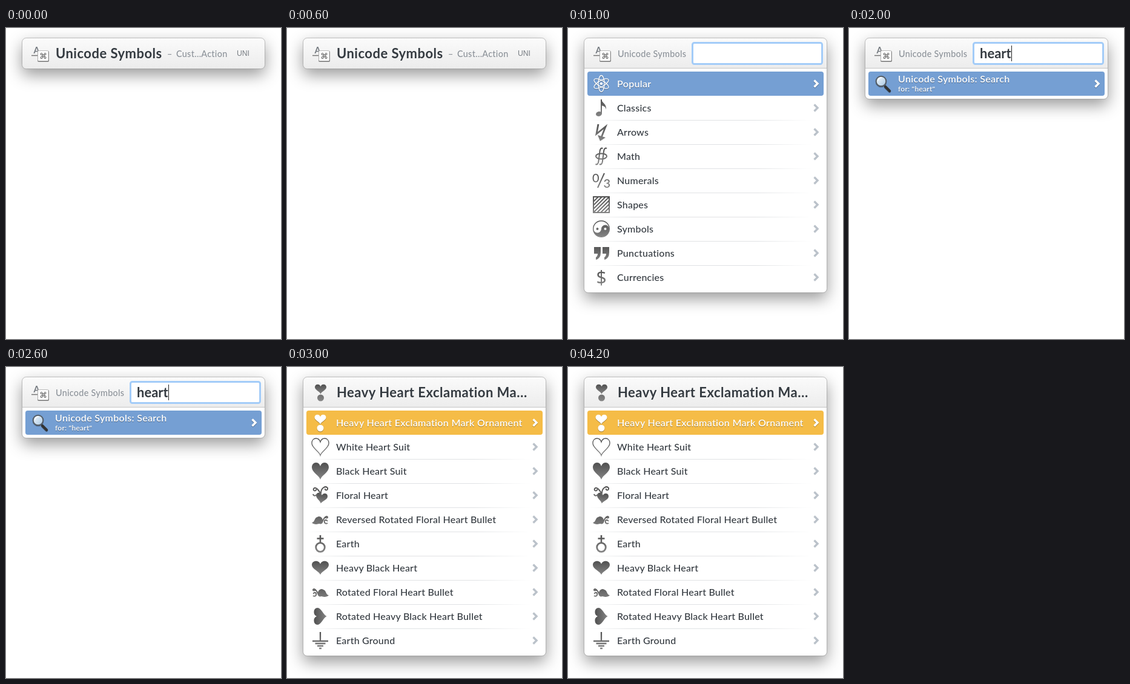
An HTML page for the animation above (5 s loop, 454 px wide and 514 px high).

```html
<!DOCTYPE html>
<html lang="en">
<head>
<meta charset="utf-8">
<title>Symbol finder</title>
<style>
html, body { margin: 0; width: 100%; height: 100%; overflow: hidden; background: #fff; }
svg { display: block; }
text { font: 500 16px Lato, "Open Sans", sans-serif; letter-spacing: .013em; fill: #343a40; }
.title { font-size: 22px; font-weight: 700; letter-spacing: .022em; }
.small { font-size: 14.4px; fill: #8c9299; letter-spacing: .02em; }
.panel { fill: #fff; filter: drop-shadow(0 10px 13px rgba(0,0,0,.4)); }
.edge { fill: none; stroke: rgba(0,0,0,.24); }
.icon { fill: url(#ink); }
.line { fill: none; stroke: url(#ink); stroke-width: 2; }
.chevron { fill: none; stroke: #bbc2ca; stroke-width: 3.4; }
.on { filter: drop-shadow(0 1px .6px rgba(0,0,0,.35)); }
.on text { fill: #fff; font-weight: 600; letter-spacing: .02em; }
.on .icon { fill: #fff; }
.on .line, .on .chevron { stroke: #fff; }
.on .sub { font-size: 12px; }
</style>
</head>
<body>
<svg width="454" height="514" viewBox="0 0 454 514">
<defs>
  <linearGradient id="ink" gradientUnits="userSpaceOnUse" x1="0" y1="-14" x2="0" y2="14">
    <stop stop-color="#505050"/><stop offset="1" stop-color="#858585"/>
  </linearGradient>
  <linearGradient id="bar" x2="0" y2="1">
    <stop stop-color="#fbfbfb"/><stop offset="1" stop-color="#ececec"/>
  </linearGradient>
  <linearGradient id="fade">
    <stop stop-color="#e0e2e4" stop-opacity="0"/><stop offset=".2" stop-color="#e0e2e4"/>
    <stop offset=".75" stop-color="#e0e2e4"/><stop offset="1" stop-color="#e0e2e4" stop-opacity="0"/>
  </linearGradient>
  <linearGradient id="glass" x2="1" y2="1">
    <stop stop-color="#f4f9fd"/><stop offset="1" stop-color="#a9c8e4"/>
  </linearGradient>
  <clipPath id="box"><path d="M-13-13h26v26h-26z"/></clipPath>
</defs>
<g id="stage"></g>
</svg>
<script>
const BLUE = '#759fd3', GOLD = '#f5bc47';
const HEART = 'M0 14C-2 7-14 2-14-6C-14-11-11-14-7-14C-3-14-1-11 0-8C1-11 3-14 7-14C11-14 14-11 14-6C14 2 2 7 0 14Z';

const text = (x, y, s, cls = '') => `<text x="${x}" y="${y}" class="${cls}">${s}</text>`;
const line = (d, extra = '') => `<path class="line" d="${d}" ${extra}/>`;
const heart = (move = '') => `<path class="icon" d="${HEART}" transform="${move}"/>`;
const at = (x, y, body) => `<g transform="translate(${x} ${y})">${body}</g>`;
const dot = (x, y, r) => `<circle class="icon" cx="${x}" cy="${y}" r="${r}"/>`;

const vine = '<path class="icon" d="M-4 4C-5-3 1-7 5-4C10-3 9 5 14 5C11 9 4 8 2 7C-1 8-4 7-4 4Z"/>' +
  line('M-3 5C-6-4-11-7-12-4C-12-2-9-2-9-4M-12 6C-9 8-6 6-7 2C-8 0-12 1-11 3');
const quote = 'M-12-10h11v9q0 10-8 12v-4q3-2 3-6h-6z';
const integral = 'M5-13q-4-2-5 5l-2 16q-1 7-5 5';

const icon = {
  atom: [30, 90, 150].map(a =>
    `<ellipse class="line" rx="13.5" ry="5" style="stroke-width:1.3" transform="rotate(${a})"/>`).join('') + dot(0, 0, 2.2),
  note: '<ellipse class="icon" cx="-4" cy="10" rx="5" ry="3.8" transform="rotate(-15 -4 10)"/>' +
    line('M0 10V-14') + '<path class="icon" d="M0-14c1 6 9 7 8 17c-1-6-5-6-8-7z"/>',
  bolt: line('M-5-13L-8 3L7-9L0 9', 'style="stroke-width:2.8"') + '<path class="icon" d="M-6 5L-2 15L7 9z"/>',
  integral: line(integral, 'transform="translate(-2.5 0)"') + line(integral, 'transform="translate(4 0)"') +
    '<ellipse class="line" rx="9" ry="4.6"/>',
  fraction: '<g class="icon">' +
    '<text x="-15" y="3" style="font-size:20px;fill:inherit">0</text>' +
    '<text x="3.5" y="12" style="font-size:20px;fill:inherit">3</text></g>' + line('M5-12L-6 12'),
  hatch: '<g clip-path="url(#box)">' +
    line([-18, -12, -6, 0, 6, 12, 18].map(k => `M${k - 14} 14L${k + 14}-14`).join('')) +
    '</g>' + line('M-13-13h26v26h-26z'),
  yin: '<circle class="line" r="13.3" style="stroke-width:1.4"/>' +
    '<path class="icon" d="M-13 0A13 13 0 0 0 13 0A6.5 6.5 0 0 0 0 0A6.5 6.5 0 0 1-13 0"/>' +
    dot(-6.5, 0, 2) + '<circle cx="6.5" r="2" fill="#fff"/>',
  quotes: `<path class="icon" d="${quote}"/><path class="icon" d="${quote}" transform="translate(14 0)"/>`,
  dollar: '<g class="icon"><text y="10.5" text-anchor="middle" style="font:30px Noto Sans,sans-serif;letter-spacing:0;fill:inherit">$</text></g>',
  lens: '<path d="M5 5L12 12" stroke="#333" stroke-width="4.5" stroke-linecap="round"/>' +
    '<circle cx="-2" cy="-4" r="8.3" fill="url(#glass)" stroke="#555d66" stroke-width="2"/>' +
    '<path d="M-7-5q1-5 6-5" fill="none" stroke="#fff" stroke-width="1.5"/>',
  mark: heart('translate(0 -5.3) scale(.68 .57)') + dot(0, 9, 5.5),
  outline: line(HEART, 'style="stroke-width:1.4"'),
  heart: heart(),
  floral: heart('translate(2 5) rotate(8) scale(.68 .62)') +
    line('M1 0C-1-8-8-15-11-11C-13-7-6-6-7-10M1-3C1-13 9-16 12-12C13-8 7-7 8-11M-12-2C-11 2-7 1-5-2'),
  vineLeft: `<g transform="scale(-1 1)">${vine}</g>`,
  vine,
  earth: '<circle class="line" cy="6" r="7.3" style="stroke-width:2.8"/>' + line('M0-1V-14M-5.5-8.5h11', 'style="stroke-width:2.6"'),
  wide: heart('scale(1 .8)'),
  turned: heart('scale(.75 1) rotate(-90)'),
  ground: line('M0-14V1M-13 1h26M-8.5 5h17M-5 9h10M-2 13h4', 'style="stroke-width:2.3"')
};

const card = '<text x="45.5" y="42" style="font-size:14.5px;font-weight:700;fill:#777c82">A</text>' +
  '<path d="M42 45.5h11" stroke="#777" stroke-width="1.5"/>' +
  '<rect x="52" y="38" width="19" height="18" rx="2" fill="#777"/>' +
  '<rect x="52.5" y="37.5" width="17.5" height="17" rx="1.5" fill="#fff" stroke="#aaa" stroke-width=".8"/>' +
  '<text x="61.2" y="50.5" text-anchor="middle" style="font:13px DejaVu Sans,sans-serif;letter-spacing:0;fill:#555">⌘</text>';

const field = card + text(82, 48, 'Unicode Symbols', 'small') +
  '<rect x="205.5" y="24.5" width="214" height="35" rx="3" fill="#fff" stroke="#a3ccf8" stroke-width="3"/>';

const chevron = y => `<path class="chevron" d="M406.5 ${y - 5.5}l5.5 5.5l-5.5 5.5"/>`;

function panel(bottom, header, body = '') {
  const rule = body && '<path d="M27 66.5H427" stroke="#c5c5c5"/>';
  const bar = body ? 'M27 67V23a7 7 0 0 1 7-7H420a7 7 0 0 1 7 7V67z'
    : 'M34 16H420a7 7 0 0 1 7 7V60a7 7 0 0 1-7 7H34a7 7 0 0 1-7-7V23a7 7 0 0 1 7-7z';
  const rect = cls => `<rect class="${cls}" x="26.5" y="16.5" width="401" height="${bottom - 16}" rx="7"/>`;
  return rect('panel') + `<path d="${bar}" fill="url(#bar)"/>` + rule + rect('edge') + header + body;
}

const picked = (color, body) =>
  `<rect x="32" y="72" width="390" height="40" rx="4" fill="${color}"/><g class="on">${body}${chevron(92)}</g>`;

function list(color, rows) {
  return rows.map(([name, label], i) => {
    const y = 92 + 40 * i;
    const row = at(55, y, icon[name]) + text(81, y + 6, label);
    if (!i) return picked(color, row);
    const rule = i < rows.length - 1 ? `<rect x="32" y="${y + 20}" width="370" height="1" fill="url(#fade)"/>` : '';
    return row + chevron(y) + rule;
  }).join('');
}

const scenes = [
  panel(67, card + text(82, 50, 'Unicode Symbols', 'title') + text(266, 48, '–', 'small') +
    text(281, 48, 'Cust…Action', 'small') +
    '<text x="381" y="46" style="font:12.2px Liberation Sans,sans-serif;letter-spacing:0;fill:#777c82">UNI</text>'),

  panel(437, field, list(BLUE, [
    ['atom', 'Popular'], ['note', 'Classics'], ['bolt', 'Arrows'], ['integral', 'Math'],
    ['fraction', 'Numerals'], ['hatch', 'Shapes'], ['yin', 'Symbols'],
    ['quotes', 'Punctuations'], ['dollar', 'Currencies']
  ])),

  panel(117, field + '<text x="216" y="50" class="title" style="letter-spacing:0">heart</text>' +
    '<path d="M268.5 29V55" stroke="#222"/>',
    picked(BLUE, at(55, 92, icon.lens) + text(81, 90, 'Unicode Symbols: Search') +
      text(81, 105, 'for: "heart"', 'sub'))),

  panel(477, at(55.5, 42, icon.mark) + text(82, 50, 'Heavy Heart Exclamation Ma…', 'title'), list(GOLD, [
    ['mark', 'Heavy Heart Exclamation Mark Ornament'], ['outline', 'White Heart Suit'],
    ['heart', 'Black Heart Suit'], ['floral', 'Floral Heart'],
    ['vineLeft', 'Reversed Rotated Floral Heart Bullet'], ['earth', 'Earth'],
    ['wide', 'Heavy Black Heart'], ['vine', 'Rotated Floral Heart Bullet'],
    ['turned', 'Rotated Heavy Black Heart Bullet'], ['ground', 'Earth Ground']
  ]))
];

const stage = document.getElementById('stage');
stage.innerHTML = scenes.map(s => `<g>${s}</g>`).join('');
const start = performance.now();

function draw() {
  const t = Math.max(0, performance.now() - start) % 5000;
  const now = Math.min(3, Math.floor(t / 1000));
  [...stage.children].forEach((g, i) => g.style.display = i === now ? '' : 'none');
  requestAnimationFrame(draw);
}
draw();
</script>
</body>
</html>
```
